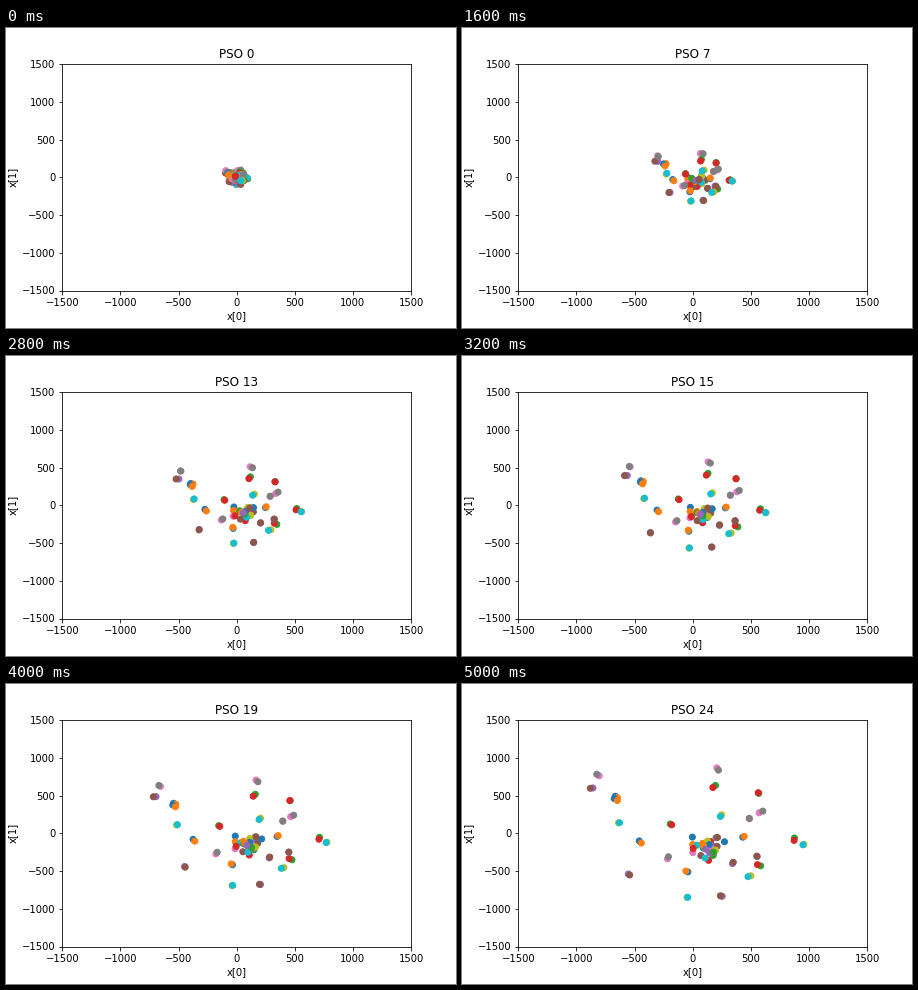
Write a matplotlib script that moves like this. It is 450x300 px and loops after 5.2 s.

```python
import matplotlib.pyplot as plt
import numpy as np
from matplotlib.animation import FuncAnimation

STEPS = 24
SPREAD = 0.1  # size of the swarm at the start, relative to the end
CORE = 26     # particles that stay near the middle

# Where each outer pair of particles ends up.
GOALS = [
    (-650, 490), (890, -80), (-875, 595), (-810, 770), (-55, -850),
    (-60, -500), (575, 525), (240, -820), (225, 850), (-645, 150),
    (450, -40), (180, 625), (-540, -560), (590, 290), (965, -140),
    (-440, -115), (575, -420), (540, -290), (-200, -320), (250, 230),
    (-665, 440), (-190, 130), (360, -398), (480, 190), (490, -580),
]

rng = np.random.default_rng(11)

# Outer pairs fly straight out of the middle, each at its own constant speed.
outer_end = np.repeat(GOALS, 2, axis=0) + rng.uniform(-20, 20, (2 * len(GOALS), 2))
outer_start = SPREAD * outer_end + rng.uniform(-15, 15, outer_end.shape)

# The core starts as a round clump and drifts to the lower right.
core_end = rng.normal((130, -185), (85, 75), (CORE, 2))
core_start = rng.uniform(-70, 70, (CORE, 2))

start = np.vstack([core_start, outer_start])
end = np.vstack([core_end, outer_end])
colors = [f"C{i % 10}" for i in [*range(CORE), *range(len(outer_end))]]

fig = plt.figure(figsize=(6.25, 300 / 72), dpi=72, facecolor="white")
ax = fig.add_axes([0.125, 0.125, 0.775, 0.755])
ax.set(xlim=(-1500, 1500), ylim=(-1500, 1500), xlabel="x[0]", ylabel="x[1]")
title = ax.set_title("PSO 0")
dots = ax.scatter(*start.T, c=colors)


def update(frame):
    step = max(0, frame - 1)  # the first step is held twice as long
    dots.set_offsets(start + (end - start) * step / STEPS)
    title.set_text(f"PSO {step}")
    return dots, title


anim = FuncAnimation(fig, update, frames=STEPS + 2, interval=200,
                     repeat=True, repeat_delay=0)
plt.show()
```
